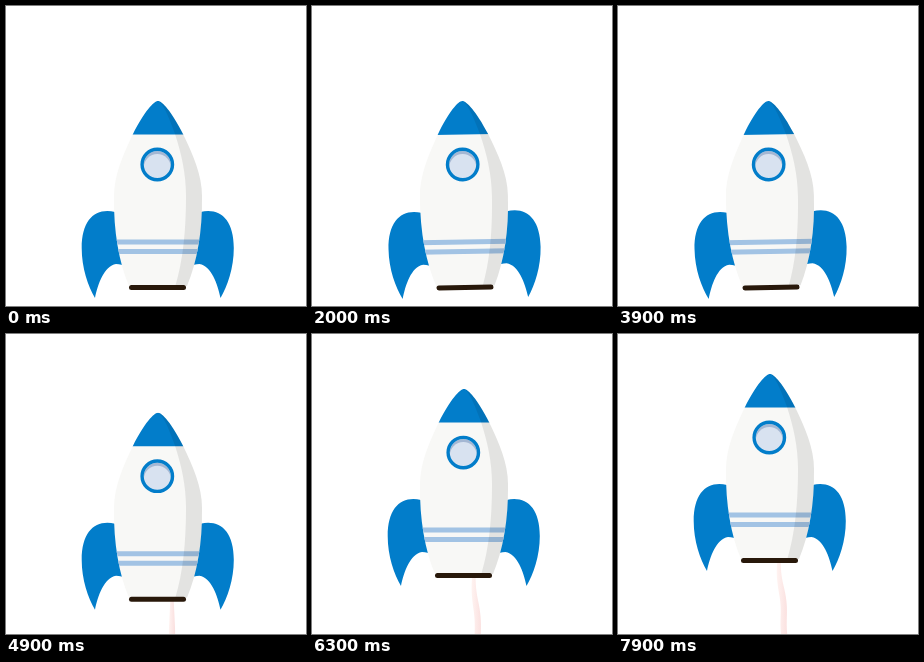
Animation of 300 by 300 pixels, one loop 8000 ms. Source, as an HTML page:

```html
<!DOCTYPE html>
<html lang="en">
<head>
<meta charset="utf-8">
<title>Rocket launch</title>
<style>
  html, body { margin: 0; width: 100%; height: 100%; overflow: hidden; background: #fff; }
  svg { display: block; width: 100vw; height: 100vh; }
</style>
</head>
<body>
<svg viewBox="0 0 300 300">
  <defs>
    <path id="hull" d="M152 95C148 95 138.500 105 127 128C117 149 108 169 108 190C107.500 226 113 256 123 280H181C191 256 196.500 226 196 190C196 169 187 149 177 128C165.500 105 156 95 152 95Z"/>
    <clipPath id="hullClip"><use href="#hull"/></clipPath>
    <clipPath id="glassClip"><circle cx="151.300" cy="158.500" r="14"/></clipPath>
    <path id="fin" d="M109 206C90 201.500 75.700 213 75.700 242C75.700 262 82 280 89 292C92 278 98 260 110 258C114 258 117 259 120 261Z"/>
    <linearGradient id="smoke">
      <stop offset="0" stop-color="#fff3f1"/>
      <stop offset="1" stop-color="#fadfde"/>
    </linearGradient>
  </defs>
  <path id="trail" fill="url(#smoke)"/>
  <g id="rocket">
    <g fill="#027dca">
      <use href="#fin"/>
      <use href="#fin" transform="translate(303.500 0) scale(-1 1)"/>
    </g>
    <use href="#hull" fill="#f8f8f6"/>
    <g clip-path="url(#hullClip)">
      <path d="M100 90H200V128.500H100Z" fill="#027dca"/>
      <path d="M100 233.500H200V238.500H100ZM100 243H200V248H100Z" fill="#a2c3e4"/>
      <path d="M152 94C159 101 163 112 169 128C175.500 148 180 168 180 190C180 225 177 255 169 281H200V94Z" opacity=".085"/>
    </g>
    <circle cx="151.300" cy="158.500" r="13.500" fill="#a4b7d3"/>
    <circle cx="151.300" cy="161.500" r="13.500" fill="#d8e2f0" clip-path="url(#glassClip)"/>
    <circle cx="151.300" cy="158.500" r="15.200" fill="none" stroke="#027dca" stroke-width="3.400"/>
    <rect x="123" y="279" width="57" height="5" rx="2.500" fill="#28180a"/>
  </g>
</svg>
<script>
const LOOP = 8000, STEP = 100;
const LIFTOFF = 3935, SPEED = 0.0169, MAX_LIFT = 55;
const SWAY = 1950, SWAY_END = 2 * SWAY;
const rocket = document.getElementById('rocket');
const trail = document.getElementById('trail');

const clamp = (v, lo, hi) => Math.min(hi, Math.max(lo, v));

// One degree of rocking that eases in from rest and back to it.
function tilt(t) {
  const wave = -Math.cos(2 * Math.PI * t / SWAY);
  if (t < SWAY / 2) return (wave + 1) / 2;
  if (t < SWAY_END) return wave;
  return t < SWAY_END + SWAY / 2 ? (wave - 1) / 2 : 0;
}

// The trail starts straight, then leans and ripples as the rocket climbs.
function trailPath(t, lift) {
  const bend = Math.sqrt(clamp((t - 4900) / 2000, 0, 1));
  const left = [], right = [];
  for (let depth = 0; depth <= 80; depth += 4) {
    const x = 166 - bend * (5 * (1 - depth / 60) + Math.sin(depth / 9));
    const half = 1.7 + 1.4 * Math.min(1, depth / 30);
    const y = 282 - lift + depth;
    left.push(`${x - half} ${y}`);
    right.unshift(`${x + half} ${y}`);
  }
  return `M${[...left, ...right].join('L')}Z`;
}

function render(ms) {
  const t = Math.floor((ms % LOOP) / STEP) * STEP;
  const lift = clamp((t - LIFTOFF) * SPEED, 0, MAX_LIFT);
  rocket.setAttribute('transform',
    `translate(0 ${-lift}) rotate(${tilt(t)} 151.7 195)`);
  trail.setAttribute('d', lift > 0 ? trailPath(t, lift) : '');
}

const start = performance.now();
function tick() {
  render(performance.now() - start);
  requestAnimationFrame(tick);
}
tick();
</script>
</body>
</html>
```
